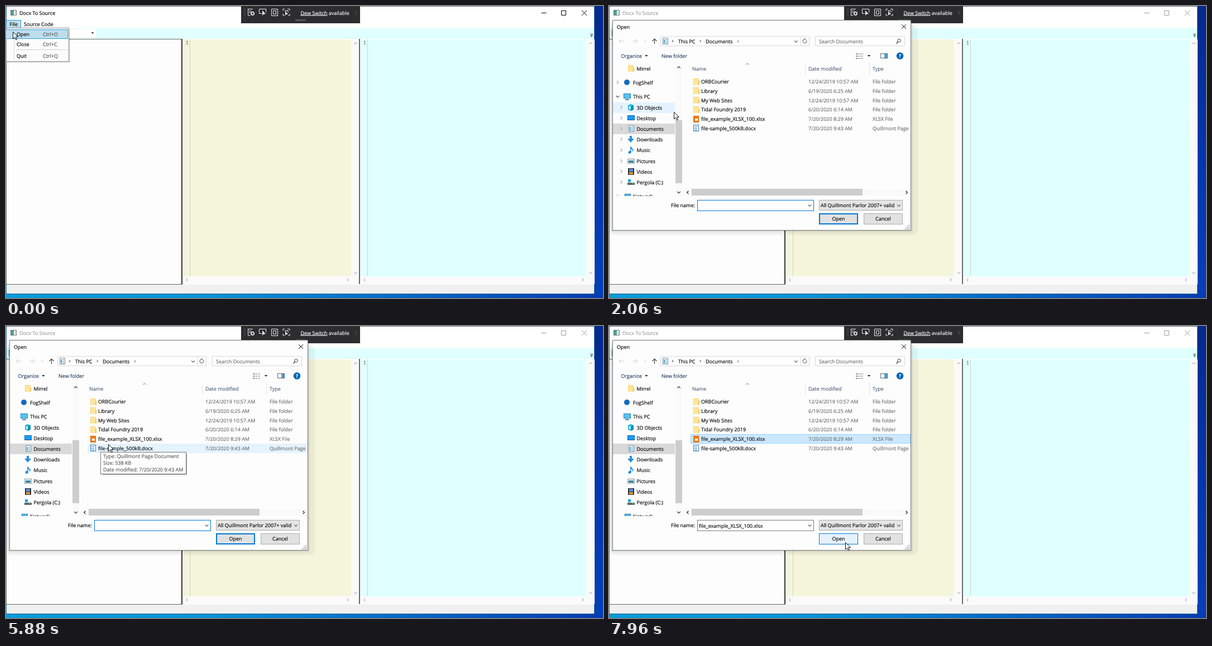
Recreate the animation shown at these times as an HTML page. Size 1069x524 px, loop 8 s.

```html
<!DOCTYPE html>
<html lang="en">
<head>
<meta charset="utf-8">
<title>Docx To Source</title>
<style>
html, body { margin: 0; width: 100%; height: 100%; overflow: hidden; background: #fff; }
svg { display: block; width: 1069px; height: 524px; }
text { font: 9px "Open Sans", "Noto Sans", sans-serif; white-space: pre; text-rendering: geometricPrecision; stroke-width: 0.15; }
.mono { font-family: "Noto Sans Mono", "DejaVu Sans Mono", monospace; }
.bold { font-weight: 700; }
rect { shape-rendering: crispEdges; }
.soft { shape-rendering: auto; }
</style>
</head>
<body>
<svg id="stage" viewBox="0 0 1069 524" xmlns="http://www.w3.org/2000/svg"></svg>
<script>
const LOOP = 8000;
const BLUE = '#0078d7';

// Markup helpers
const rect = (x, y, w, h, fill, more = '') => `<rect x="${x}" y="${y}" width="${w}" height="${h}" fill="${fill}" ${more}/>`;
const box = (x, y, w, h, fill, line, lw = 1) =>
  rect(x + lw / 2, y + lw / 2, w - lw, h - lw, fill, `stroke="${line}" stroke-width="${lw}"`);
const text = (x, y, s, fill = '#000', more = '') => `<text x="${x}" y="${y}" fill="${fill}" stroke="${fill}" ${more}>${s}</text>`;
const path = (d, line, lw = 1, fill = 'none') => `<path d="${d}" stroke="${line}" stroke-width="${lw}" fill="${fill}"/>`;
const group = (id, body, more = '') => `<g id="${id}" ${more}>${body}</g>`;
const disc = (x, y, r, fill) => `<circle cx="${x}" cy="${y}" r="${r}" fill="${fill}"/>`;
const drop = (x, y, fill = '#222', r = 3) => path(`M${x - r} ${y - r / 2}h${2 * r}l${-r} ${r}z`, 'none', 0, fill);

const TURN = { right: 0, down: 90, left: 180, up: 270 };
const chevron = (x, y, dir, line = '#555', lw = 1.1, r = 2.8) =>
  `<path d="M${-r / 2} ${-r}L${r / 2} 0L${-r / 2} ${r}" fill="none" stroke="${line}" stroke-width="${lw}" transform="translate(${x} ${y}) rotate(${TURN[dir]})"/>`;

// Small icons, drawn around their centre
const icons = {
  folder: (x, y) => rect(x - 5, y - 6, 10, 12, '#f6d57c') + rect(x - 4, y - 5, 9, 11, '#ffe59a') + rect(x + 4, y - 2, 2, 8, '#f0cb6a'),
  cloud: (x, y) => disc(x, y, 5, '#0f6cbd'),
  pc: (x, y) => box(x - 6, y - 6, 13, 9, '#54c3f1', '#2b83b5') + rect(x - 3, y + 4, 7, 2, '#3f86ad'),
  cube: (x, y) => path(`M${x - 5} ${y - 4}l5 -2l5 2v8l-5 2l-5 -2z`, 'none', 0, '#25bdd8') +
    path(`M${x} ${y - 2}l5 -2v8l-5 2z`, 'none', 0, '#0e8fb5') + rect(x - 3, y - 2, 3, 5, '#c8f3fa'),
  desktop: (x, y) => box(x - 6, y - 5, 13, 9, '#1e9bf0', '#0b6ec5') + rect(x - 6, y + 3, 13, 1, '#0a4f96'),
  doc: (x, y) => box(x - 4.5, y - 6, 10, 12, '#f5fafc', '#7894a5') + rect(x - 2, y - 3, 2, 7, '#4a9ccc') +
    [-3, 0, 3].map(d => rect(x + 1, y + d, 3, 1, '#4a87ab')).join(''),
  down: (x, y) => path(`M${x - 2} ${y - 6}h4v5h4l-6 7l-6 -7h4z`, 'none', 0, '#2b8de0'),
  music: (x, y) => disc(x - 2, y + 4, 2.5, '#1c8ce0') + path(`M${x} ${y + 4}v-10q1 4 4 5q0 2 -1 3`, '#1c8ce0', 1.6),
  picture: (x, y) => box(x - 6, y - 4, 13, 9, '#e6f1f7', '#8a9aa5') + rect(x - 4, y - 1, 9, 2, '#3d9bd3') + rect(x - 4, y + 1, 9, 2, '#3e7250'),
  video: (x, y) => rect(x - 5, y - 6, 11, 12, '#333') + rect(x - 3, y - 5, 7, 5, '#5c8fd0') + rect(x - 3, y + 1, 7, 4, '#cf9a42'),
  drive: (x, y) => rect(x - 6, y + 1, 13, 4, '#59646c') + rect(x + 2, y + 2, 3, 1, '#7ee08a') + rect(x - 5, y - 5, 5, 5, '#18a3e8'),
  net: (x, y) => box(x - 4, y - 5, 11, 9, '#54b8e8', '#2d7fb0') + disc(x - 3, y + 3, 4, '#2c78b0'),
  sheet: (x, y) => box(x - 5, y - 6, 10, 12, '#f47b16', '#dc680b') + rect(x - 2, y - 1, 5, 4, '#fff2df'),
  page: (x, y) => box(x - 5, y - 6, 10, 12, '#fff', '#2a7fbe') + [-3, 0, 3].map(d => rect(x - 3, y + d, 5, 1, '#2579bb')).join('')
};

function editor(x, width, fill) {
  const right = x + width;
  return rect(x, 60, width, 425, fill) + rect(x, 485, width + 15, 14, '#fafafa') + rect(right, 60, 15, 425, '#fafafa') +
    path(`M${x + 12.5} 60V485`, '#c9c9bd', 0.8) + text(x + 4.5, 69, '1', '#6a6a6a', 'class="mono"') +
    chevron(right + 8, 67, 'up', '#b5b5b5') + chevron(right + 8, 479, 'down', '#b5b5b5') +
    chevron(x + 7, 491.5, 'left', '#b5b5b5') + chevron(right - 6, 491.5, 'right', '#b5b5b5');
}

const caption = (id, c) => group(id,
  text(24, 16, 'Docx To Source', c) + path('M958.5 12.5h9', c) + path('M994.5 8.5h8v8h-8z', c) +
  path('M1031 8l9 9M1040 8l-9 9', c));

function appWindow() {
  return rect(0, 0, 1069, 524, 'url(#side)') + rect(0, 517, 1069, 7, 'url(#base)') +
    rect(0, 0, 1054, 517, '#2d6d9c') + rect(0, 0, 1054, 1, '#5d6a73') + rect(1, 1, 1052, 515, '#fff') +
    box(8, 7, 11, 10, '#fff', '#777') + rect(9, 8, 5, 8, '#4aa391') + rect(15, 9, 3, 6, '#d5dbe0') +
    caption('active', '#000') + caption('inactive', '#999') +
    text(6.5, 36, 'File') + text(32, 36, 'Source Code') +
    rect(1, 40, 1052, 19, '#e0ffff') + rect(60, 41, 101, 17, '#fff') +
    [43, 46, 49, 52].map(y => rect(5, y, 2, 2, '#555')).join('') +
    text(13.5, 52, 'Language:') + text(62.5, 52, 'C#') + drop(155, 48.5, '#111', 2.5) +
    rect(1046, 50, 5, 1, '#333') + drop(1048.5, 54, '#333', 2.5) +
    box(0, 59, 316, 441, '#fdfdfd', '#6a6a6a') + rect(314, 59, 2, 440, '#333') +
    editor(317, 301, '#f5f5dc') + rect(632, 59, 2, 440, '#666') + editor(635, 404, '#e0ffff') +
    rect(1, 500, 1052, 16, '#f0f0f0');
}

function debugBar() {
  const c = '#eee';
  return rect(421, 0, 213, 31, '#2d2d30') +
    [4, 7, 10, 13, 16].map(y => rect(426, y, 1, 1, '#666') + rect(428, y + 1, 1, 1, '#666')).join('') +
    path('M433 5.5h9M433.5 5v12h4M435 9h5M435 12h3', c) + `<circle cx="441.5" cy="13.5" r="2.6" fill="none" stroke="${c}" stroke-width="1.6"/>` +
    path('M458 13.5h-4.5v-8h12v6', c) + path('M459 8v9l2.5 -2.5h3.5z', 'none', 0, c) +
    path('M475.5 5.5h11v12h-11zM478.5 8.5h5v6h-5z', c) +
    path('M496 8.5v-3h3M504 5.5h4v3M496 14v3h3M508 14v3h-3M499 8.5h6v3', c) + path('M500 9v8l2 -2h3z', 'none', 0, c) +
    rect(518, 24, 19, 3, '#555') +
    text(527.5, 15.5, '<tspan text-decoration="underline">Dew Switch</tspan> available', '#fff') +
    chevron(627, 12, 'left', '#666', 1, 3.5);
}

function fileMenu() {
  const items = [['Open', 'Ctrl+O', 54], ['Close', 'Ctrl+C', 72], ['Quit', 'Ctrl+Q', 93]];
  return box(0, 25, 27, 15, '#c0ddeb', '#26a0da') + text(6.5, 36, 'File') +
    rect(2, 42, 113, 60, '#000', 'opacity=".12"') + box(0, 39, 113, 61, '#fcfcfc', '#8f8f8f') +
    rect(14, 42, 1, 55, '#dcdcdc') + rect(18, 78, 93, 1, '#d0d0d0') + box(-1, 42, 112, 17, '#bfdeed', '#26a0da') +
    items.map(([name, key, y]) => text(19, y, name) + text(66, y, key, '#555')).join('');
}

const tree = [
  ['Mirrel', 'folder', 112, 1], ['FogShelf', 'cloud', 137, 0], ['This PC', 'pc', 162.5, 0],
  ['3D Objects', 'cube', 182, 1], ['Desktop', 'desktop', 201, 1], ['Documents', 'doc', 220, 1],
  ['Downloads', 'down', 239, 1], ['Music', 'music', 258.5, 1], ['Pictures', 'picture', 278, 1],
  ['Videos', 'video', 297, 1], ['Pergola (C:)', 'drive', 316, 1], ['Network', 'net', 341.5, 0]
];
const files = [
  ['ORBCourier', '12/24/2019 10:57 AM', 'File folder', 'folder'],
  ['Library', '6/19/2020 6:25 AM', 'File folder', 'folder'],
  ['My Web Sites', '12/24/2019 10:57 AM', 'File folder', 'folder'],
  ['Tidal Foundry 2019', '6/20/2020 6:14 AM', 'File folder', 'folder'],
  ['file_example_XLSX_100.xlsx', '7/20/2020 8:29 AM', 'XLSX File', 'sheet'],
  ['file-sample_500kB.docx', '7/20/2020 9:43 AM', 'Quillmont Page', 'page']
];

const treeRows = () => tree.map(([name, icon, y, deep]) =>
  icons[icon](deep ? 39 : 32, y) + text(deep ? 49.5 : 43, y + 3.5, name)).join('');
const treeMarks = () => tree.slice(1).map(([name, , y, deep]) =>
  chevron(deep ? 22 : 15.5, y, name === 'This PC' ? 'down' : 'right', name === 'This PC' ? '#444' : '#aaa')).join('');
const fileRows = () => files.map(([name, date, type, icon], i) => {
  const y = 135.5 + i * 16.75;
  return icons[icon](156, y) + text(165, y + 3.5, name) + text(357, y + 3.5, date, '#6d6d6d') + text(472, y + 3.5, type, '#6d6d6d');
}).join('');

function dialog() {
  const head = '#4c607a', bar = '#1e395b';
  const frame = rect(0, 34, 553, 377, '#000', 'class="soft" rx="9" opacity=".045"') +
    rect(3, 30, 541, 376, '#000', 'class="soft" rx="4" opacity=".08"') + box(6, 25, 535, 378, '#fdfdfd', '#707478');
  const nav = text(14, 41, 'Open') + path('M524 33l8 8M532 33l-8 8', '#111') +
    path('M27 63h-9M22 59l-4 4l4 4M42 63h9M47 59l4 4l-4 4', '#d0d0d0') + chevron(65, 63, 'down', '#ccc', 1, 2) +
    path('M81.5 68v-9M77.5 63l4 -4l4 4', '#444', 1.2) +
    box(92, 54, 267, 18, '#fff', '#d9d9d9') + rect(343, 55, 1, 16, '#d9d9d9') + icons.doc(100, 63) +
    chevron(114, 63, 'right', '#333', 1, 2) + text(124, 66.5, 'This PC') + chevron(163.5, 63, 'right', '#333', 1, 2) +
    text(173, 66.5, 'Documents') + chevron(335, 63.5, 'down') +
    path('M353.5 61.2a3.5 3.5 0 1 1 -3 -1.7M350 57.5l2 2l-2 2', '#444') + box(369, 54, 161, 18, '#fff', '#d9d9d9') +
    group('crumb', chevron(231, 63.5, 'right', '#333', 1, 2));
  const late = text(376, 66.5, 'Search Documents', '#6d6d6d') +
    '<circle cx="519.5" cy="62" r="2.8" fill="none" stroke="#444"/>' + path('M517.5 64l-3 3.5', '#444', 1.3) +
    text(21.5, 92.5, 'Organize', bar) + drop(67, 89.5, bar) + text(94, 92.5, 'New folder', bar) +
    [0, 4, 8].map(d => rect(442, 85 + d, 4, 2, '#999') + rect(447, 85 + d, 3, 2, '#bbb') + rect(451, 85 + d, 4, 2, '#bbb')).join('') +
    drop(465.5, 89.5, '#333');
  const tools = box(486, 85, 13, 9, '#fff', '#666') + rect(493, 86, 5, 7, '#4aa0dc') +
    disc(521, 89.5, 6.3, '#0063b1') + text(521, 93, '?', '#fff', 'text-anchor="middle" class="bold"');
  const side = group('treeHover', rect(7, 0, 111, 19, '#e5f3ff')) + rect(7, 211, 111, 19, '#d9d9d9') +
    `<g clip-path="url(#cut)">${treeRows()}${group('marks', treeMarks())}</g>` +
    rect(119, 102, 12, 239, '#fafafa') + rect(119, 205, 12, 113, '#cdcdcd') +
    chevron(125, 110, 'up', '#333', 1.3) + chevron(125, 334.5, 'down', '#333', 1.3);
  const list = group('rowHover', rect(146, 0, 394, 17, '#e5f3ff')) +
    group('picked', box(146, 194, 394, 17, '#cce8ff', '#99d1ff')) +
    text(149, 116, 'Name', head) + text(357, 116, 'Date modified', head) + text(472, 116, 'Type', head) +
    chevron(248, 104, 'up', '#777', 1) + rect(351, 102, 1, 21, '#e2e2e2') + rect(466, 102, 1, 21, '#e2e2e2') +
    `<g clip-path="url(#cut)">${fileRows()}</g>` +
    rect(135, 328, 405, 13, '#fafafa') + rect(148, 328, 306, 12, '#cdcdcd') +
    chevron(141, 334.5, 'left', '#333', 1.3) + chevron(533, 334.5, 'right', '#333', 1.3);
  const foot = text(111, 361, 'File name:') + box(158, 348, 209, 20, '#fff', '#7a7a7a') +
    group('focus', box(158, 348, 209, 20, 'none', BLUE)) + group('caret', rect(161, 352, 1, 12, '#111')) +
    group('chosen', text(161, 361.5, files[4][0])) + chevron(359.5, 358, 'down') +
    box(376, 348, 150, 19, '#e5e5e5', '#adadad') +
    `<g clip-path="url(#kind)">${text(379, 361, 'All Quillmont Parlor 2007+ valid files')}</g>` + chevron(519, 358, 'down') +
    box(376, 372, 70, 20, '#e1e1e1', BLUE, 2) + group('openHover', box(376, 372, 70, 20, '#e5f1fb', BLUE)) +
    box(456, 372, 70, 20, '#e1e1e1', '#adadad') + group('cancelHover', box(456, 372, 70, 20, '#e5f1fb', BLUE)) +
    text(411, 385, 'Open', '#000', 'text-anchor="middle"') + text(491, 385, 'Cancel', '#000', 'text-anchor="middle"') +
    [[537, 394], [537, 397], [534, 397], [537, 400], [534, 400], [531, 400]].map(([x, y]) => rect(x - 1, y - 1, 2, 2, '#aaa')).join('');
  return frame + nav + group('late', late) + tools + side + list + foot;
}

const tip = () => rect(172, 229, 152, 38, '#000', 'opacity=".35"') + box(169, 226, 154, 40, '#fff', '#767676') +
  ['Type: Quillmont Page Document', 'Size: 538 KB', 'Date modified: 7/20/2020 9:43 AM']
    .map((s, i) => text(174, 237 + i * 12, s, '#575757')).join('');

const grad = (id, dir, ...stops) => `<linearGradient id="${id}" x2="${dir === 'x' ? 1 : 0}" y2="${dir === 'x' ? 0 : 1}">` +
  stops.map((c, i) => `<stop offset="${i / (stops.length - 1)}" stop-color="${c}"/>`).join('') + '</linearGradient>';

// The dialog opens above the debug bar
document.getElementById('stage').innerHTML =
  `<defs>${grad('side', 'y', '#032a8c', '#0436ac', '#0540b8')}${grad('base', 'x', '#0a9bd8', '#0b93d6', '#0668c4', '#053bb0')}
  <clipPath id="cut"><rect x="7" y="102" width="532" height="239"/></clipPath>
  <clipPath id="kind"><rect x="377" y="349" width="134" height="17"/></clipPath></defs>` +
  appWindow() + debugBar() + group('menu', fileMenu()) + group('dialog', dialog()) + group('tip', tip()) +
  group('pointer', path('M.5 .5v12.5l3 -2.8l2.1 4.6l2 -.9l-2.1 -4.5h4z', '#111', 1, '#fff'));

// Each track lists [start time, value...]; a value holds until the next entry
const tracks = {
  pointer: [[0, 12, 46], [150, 13, 47], [1670, 40, 62], [1790, 70, 86], [1910, 92, 104], [2060, 116, 190],
    [2180, 125, 195], [2300, 135, 200], [2450, 148, 205], [2570, 158, 210], [2720, 168, 215], [2840, 174, 217],
    [2990, 175, 217], [3140, 179, 217], [3260, 183, 217], [5760, 183, 215], [5880, 183, 212], [6000, 187, 206],
    [6120, 189, 203], [6270, 189, 202], [7060, 250, 230], [7180, 370, 296], [7330, 430, 345], [7450, 470, 383],
    [7570, 455, 399], [7690, 430, 392], [7840, 423, 390], [7960, 423, 388]],
  dialog: [[0, 0, 1], [820, 0.35, 0.96], [940, 0.75, 0.985], [1090, 0.95, 0.9945], [1210, 1, 1]],
  treeHover: [[0, 0, 0], [1910, 1, 102], [2060, 1, 173], [2300, 0, 0]],
  rowHover: [[0, 0, 0], [2450, 1, 194], [2720, 1, 211], [6000, 1, 194], [6670, 0, 0]]
};
const fades = {
  menu: [[0, 1], [550, 0]],
  active: [[0, 1], [670, 0]],
  inactive: [[0, 0], [670, 1]],
  late: [[0, 0], [1210, 1]],
  crumb: [[0, 0], [1360, 1]],
  marks: [[0, 0], [1790, 0.5], [1910, 1], [2450, 0.75], [2570, 0.5], [2720, 0.25], [2840, 0]],
  caret: [[0, 1], [1670, 0], [2180, 1], [2720, 0], [3140, 1], [3660, 0], [4210, 1], [4770, 0], [5200, 1], [5760, 0], [6270, 1], [6670, 0]],
  tip: [[0, 0], [2990, 1], [6270, 0]],
  picked: [[0, 0], [6670, 1]],
  chosen: [[0, 0], [6670, 1]],
  focus: [[0, 1], [6820, 0]],
  openHover: [[0, 0], [7840, 0.5], [7960, 1]],
  cancelHover: [[0, 0], [7450, 1], [7570, 0.5], [7690, 0]]
};

const node = {};
for (const id of [...Object.keys(tracks), ...Object.keys(fades)]) node[id] = document.getElementById(id);

const at = (track, t) => track.findLast(step => step[0] <= t).slice(1);

function show(id, alpha) {
  node[id].setAttribute('opacity', alpha);
}

function draw(t) {
  for (const id in fades) show(id, at(fades[id], t)[0]);
  node.pointer.setAttribute('transform', `translate(${at(tracks.pointer, t)})`);
  const [alpha, size] = at(tracks.dialog, t);
  show('dialog', alpha);
  node.dialog.setAttribute('transform', `translate(273.5 213.5) scale(${size}) translate(-273.5 -213.5)`);
  for (const id of ['treeHover', 'rowHover']) {
    const [on, y] = at(tracks[id], t);
    show(id, on);
    node[id].setAttribute('transform', `translate(0 ${y})`);
  }
}

function tick() {
  draw(performance.now() % LOOP);
  requestAnimationFrame(tick);
}
tick();
</script>
</body>
</html>
```
